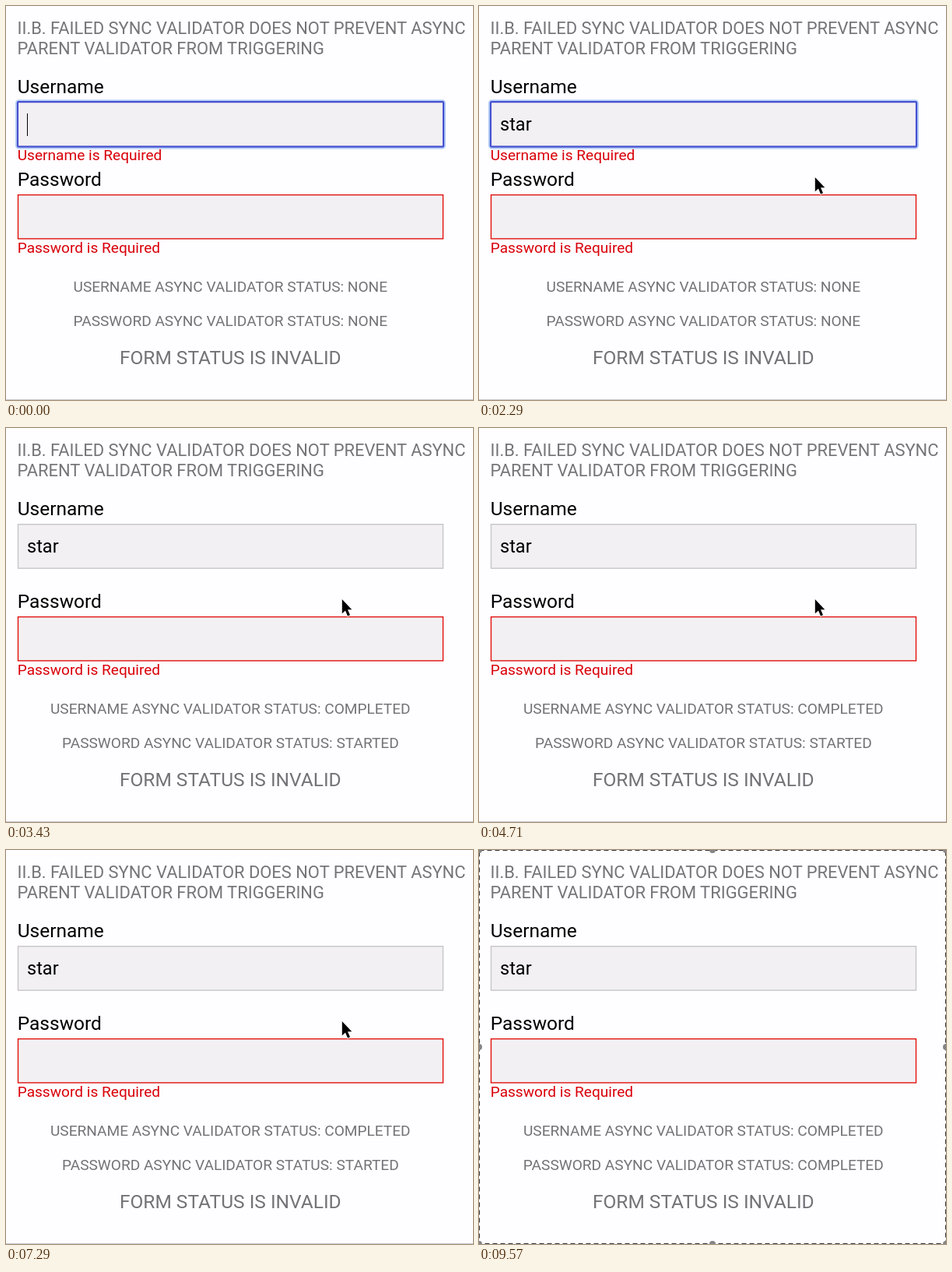
Recreate the animation shown at these times as an HTML page. Size 600x506 px, loop 9.71 s.

```html
<!DOCTYPE html>
<html lang="en">
<head>
<meta charset="utf-8">
<title>Async validator form</title>
<style>
html, body { margin: 0; width: 100%; height: 100%; overflow: hidden; background: #fefdff; }
.stage { position: absolute; left: 0; top: 0; width: 600px; height: 506px; overflow: hidden; font-family: Roboto, sans-serif; }
svg { position: absolute; left: 0; top: 0; }
.title { font-size: 21.9px; fill: #757478; }
.label { font-size: 24.5px; fill: #000; }
.error { font-size: 19.1px; fill: #d90009; }
.status { font-size: 19.1px; fill: #737276; text-anchor: middle; }
.form { font-size: 24.5px; fill: #737276; text-anchor: middle; }
.field { fill: #f2f0f3; stroke: #c6c5c9; stroke-width: 1.4; }
.invalid { stroke: #e2120c; }

/* One loop is 9710 ms; all changes are hard steps. */
.focused, .pending, .checked, .busy, .settled, .invalidForm, .pointer, .frame, .caret, .typed span {
  animation: 9710ms step-end infinite;
}
.focused { animation-name: focused; }
.pending { animation-name: pending; }
.checked { animation-name: checked; }
.busy { animation-name: busy; }
.settled { animation-name: settled; }
.invalidForm { animation-name: invalidForm; }
.pointer { animation-name: pointer; }
.frame { animation-name: frame; }
@keyframes focused { 0% { opacity: 1 } 25.02%, 100% { opacity: 0 } }
@keyframes pending { 0%, 35.32%, 100% { opacity: 0 } 25.02% { opacity: 1 } }
@keyframes checked { 0% { opacity: 0 } 35.32%, 100% { opacity: 1 } }
@keyframes busy { 0%, 76.51%, 100% { opacity: 0 } 25.02% { opacity: 1 } }
@keyframes settled { 0% { opacity: 0 } 76.51%, 100% { opacity: 1 } }
@keyframes invalidForm { 0%, 35.32%, 100% { opacity: 1 } 25.02% { opacity: 0 } }
@keyframes pointer { 0%, 92.68%, 100% { opacity: 0 } 14.72% { opacity: 1 } }
@keyframes frame { 0% { opacity: 0 } 92.68%, 100% { opacity: 1 } }

.typed { position: absolute; left: 27px; top: 137px; font-size: 23.5px; line-height: 30px; white-space: nowrap; color: #000; }
.typed span:nth-child(1) { animation-name: key1; }
.typed span:nth-child(2) { animation-name: key2; }
.typed span:nth-child(3) { animation-name: key3; }
.typed span:nth-child(4) { animation-name: key4; }
@keyframes key1 { 0% { font-size: 0 } 1.44%, 100% { font-size: 23.5px } }
@keyframes key2 { 0% { font-size: 0 } 2.98%, 100% { font-size: 23.5px } }
@keyframes key3 { 0% { font-size: 0 } 5.87%, 100% { font-size: 23.5px } }
@keyframes key4 { 0% { font-size: 0 } 7.31%, 100% { font-size: 23.5px } }
.caret { position: absolute; top: 1px; width: 1.4px; height: 29px; background: #000; animation-name: caret; }
@keyframes caret { 0%, 17.61% { opacity: 1 } 12.46%, 22.76%, 100% { opacity: 0 } }
</style>
</head>
<body>
<div class="stage">
  <svg width="600" height="506" viewBox="0 0 600 506">
    <rect y="505" width="600" height="1" fill="#c9c8cb"/>
    <text class="title" x="14.5" y="36">II.B. FAILED SYNC VALIDATOR DOES NOT PREVENT ASYNC</text>
    <text class="title" x="14.5" y="62">PARENT VALIDATOR FROM TRIGGERING</text>

    <text class="label" x="14.7" y="112">Username</text>
    <rect class="field" x="15.5" y="123.7" width="546" height="56.5"/>
    <g class="focused">
      <rect x="14.5" y="122.7" width="548" height="58.5" rx="2" fill="none" stroke="#b5cdf8" stroke-width="5"/>
      <rect x="15" y="123.2" width="547" height="57.5" rx="1" fill="#f2f0f3" stroke="#4650cf" stroke-width="2.2"/>
      <text class="error" x="14.7" y="198">Username is Required</text>
    </g>

    <text class="label" x="14.7" y="231">Password</text>
    <rect class="field invalid" x="15.5" y="242.6" width="546" height="56.3"/>
    <text class="error" x="14.7" y="317">Password is Required</text>

    <g class="status">
      <g class="focused">
        <text x="288.3" y="366.5">USERNAME ASYNC VALIDATOR STATUS: NONE</text>
        <text x="288.3" y="410.5">PASSWORD ASYNC VALIDATOR STATUS: NONE</text>
      </g>
      <text class="pending" x="288.3" y="366.5">USERNAME ASYNC VALIDATOR STATUS: STARTED</text>
      <text class="checked" x="288.3" y="366.5">USERNAME ASYNC VALIDATOR STATUS: COMPLETED</text>
      <text class="busy" x="288.3" y="410.5">PASSWORD ASYNC VALIDATOR STATUS: STARTED</text>
      <text class="settled" x="288.3" y="410.5">PASSWORD ASYNC VALIDATOR STATUS: COMPLETED</text>
    </g>
    <g class="form">
      <text class="invalidForm" x="288.3" y="459.5">FORM STATUS IS INVALID</text>
      <text class="pending" x="288.3" y="459.5">FORM STATUS IS PENDING</text>
    </g>
  </svg>

  <div class="typed"><span>s</span><span>t</span><span>a</span><span>r</span><i class="caret"></i></div>

  <svg width="600" height="506" viewBox="0 0 600 506">
    <path class="pointer" d="M431.8 220V238.3L436 234.4L439 241.6L442 240.3L439 233.3H444.3Z" fill="#000" stroke="#fff" stroke-width="1.6" paint-order="stroke"/>
    <g class="frame">
      <rect x=".5" y=".5" width="599" height="505" fill="none" stroke="#fff"/>
      <rect x=".5" y=".5" width="599" height="505" fill="none" stroke="#333" stroke-dasharray="6 4"/>
      <g fill="#858487">
        <circle r="4"/><circle cx="300" r="4"/><circle cx="600" r="4"/>
        <circle cy="253" r="4"/><circle cx="600" cy="253" r="4"/>
        <circle cy="506" r="4"/><circle cx="300" cy="506" r="4"/><circle cx="600" cy="506" r="4"/>
      </g>
    </g>
  </svg>
</div>
</body>
</html>
```
